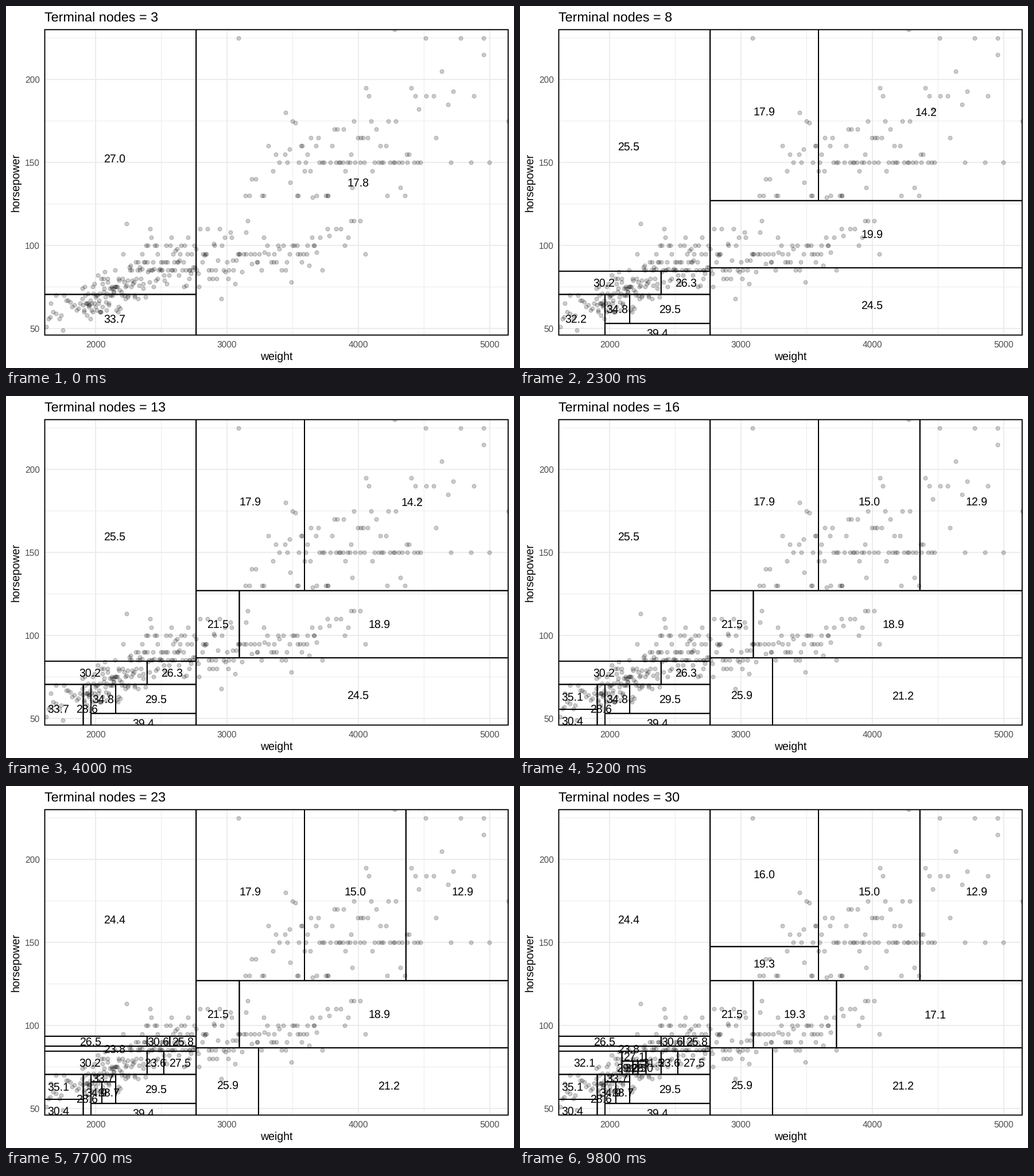
A matplotlib script that plays this animation: 885x632 px, repeating every 10 s.

```python
import matplotlib.pyplot as plt
import numpy as np
from matplotlib.animation import FuncAnimation
from matplotlib.collections import PolyCollection
from matplotlib.patches import Rectangle

W, H, DPI = 885, 632, 64
PT = 72 / DPI  # points per pixel
LEFT, TOP, RIGHT, BOTTOM = 67.5, 41.3, 874.8, 574.5
WEIGHTS, POWERS = (1613, 5140), (46, 230)
FRAMES, INTERVAL = 100, 100
FIRST, LAST = 3, 30
LINE = 1.9 * PT
INK = (0, 0, 0, 0.2)

plt.rcParams["font.family"] = "Liberation Sans"
plt.rcParams["text.hinting"] = "none"

# tree size: splits as (leaf, axis, cut, low side, high side)
SPLITS = {
    4: [("17.8", "y", 127, "20.7", "14.7")],
    5: [("27.0", "y", 84.5, "29.0", "25.5")],
    6: [("20.7", "y", 86.5, "24.5", "19.9")],
    7: [("29.0", "x", 2392, "30.2", "26.3")],
    8: [("14.7", "x", 3590, "17.9", "14.2")],
    9: [("33.7", "x", 1965, "32.2", "34.0"),
        ("34.0", "y", 53, "39.4", "33.9"),
        ("33.9", "x", 2153, "34.8", "29.5")],
    12: [("19.9", "x", 3094, "21.5", "18.9")],
    13: [("32.2", "x", 1906, "33.7", "28.6")],
    14: [("14.2", "x", 4362, "15.0", "12.9")],
    15: [("24.5", "x", 3240, "25.9", "21.2")],
    16: [("33.7", "y", 55.5, "30.4", "35.1")],
    17: [("25.5", "y", 93.5, "26.4", "24.4"),
         ("26.4", "y", 87.5, "23.8", "27.0")],
    19: [("34.8", "y", 66, "36.6", "33.7")],
    20: [("26.3", "x", 2519, "23.6", "27.5")],
    21: [("27.0", "x", 2392, "26.5", "28.0"),
         ("28.0", "x", 2565, "30.6", "25.8")],
    23: [("36.6", "x", 2048, "34.9", "38.7")],
    24: [("17.9", "y", 147.5, "19.3", "16.0")],
    25: [("30.2", "x", 2094, "32.1", "29.8"),
         ("29.8", "x", 2277, "28.9", "31.5"),
         ("28.9", "y", 78.5, "29.9", "27.1"),
         ("29.9", "x", 2177, "29.2", "30.1"),
         ("30.1", "x", 2216, "32.5", "28.0")],
    30: [("18.9", "x", 3727, "19.3", "17.1")],
}


def px(weight):
    lo, hi = WEIGHTS
    return LEFT + (weight - lo) * (RIGHT - LEFT) / (hi - lo)


def py(power):
    lo, hi = POWERS
    return BOTTOM - (power - lo) * (BOTTOM - TOP) / (hi - lo)


def cloud(rng, n, weights, shares, powers, noise, limits):
    """Cars spread along a trend, with power favouring multiples of five."""
    w = np.interp((np.arange(n) + rng.random(n)) / n, shares, weights)
    hp = np.interp(w, weights, powers) * (1 + noise * rng.normal(size=n))
    hp = np.clip(hp, *limits)
    fives = rng.random(n) < np.interp(hp, [60, 85, 105], [0.2, 0.45, 0.9])
    return w, np.where(fives, 5 * np.round(hp / 5), np.round(hp))


def make_points():
    rng = np.random.default_rng(7)
    w1, hp1 = cloud(rng, 285,
                    [1613, 1900, 2180, 2450, 2765, 3100, 3700, 4060],
                    [0, 0.07, 0.31, 0.5, 0.68, 0.81, 0.96, 1],
                    [57, 64, 74, 90, 94, 95, 101, 112], 0.1, (46, 125))
    w2, hp2 = cloud(rng, 101,
                    [3130, 3430, 3760, 4150, 4480, 4750, 5000],
                    [0, 0.1, 0.35, 0.65, 0.88, 0.96, 1],
                    [136, 143, 148, 160, 185, 195, 195], 0.12, (129, 225))
    common = (w2 > 3390) & (w2 < 4720) & (rng.random(w2.size) < 0.22)
    hp2[common] = 150
    lone = np.array([(3086, 225), (4278, 230), (5140, 175), (2234, 113),
                     (4951, 225), (4997, 150)])
    return (np.concatenate([w1, w2, lone[:, 0]]),
            np.concatenate([hp1, hp2, lone[:, 1]]))


def split(leaves, name, axis, cut, low, high):
    out = []
    for leaf in leaves:
        label, x0, x1, y0, y1 = leaf
        if label != name:
            out.append(leaf)
        elif axis == "x":
            out += [(low, x0, cut, y0, y1), (high, cut, x1, y0, y1)]
        else:
            out += [(low, x0, x1, y0, cut), (high, x0, x1, cut, y1)]
    return out


def padded(lo, hi):
    pad = 0.025 * (hi - lo)
    return lo - pad, hi + pad


def grow_trees():
    leaves = [("all", *padded(*WEIGHTS), *padded(*POWERS))]
    leaves = split(leaves, "all", "x", 2765, "light", "17.8")
    leaves = split(leaves, "light", "y", 70.5, "33.7", "27.0")
    trees = {}
    for n in range(FIRST, LAST + 1):
        for rule in SPLITS.get(n, []):
            leaves = split(leaves, *rule)
        trees[n] = leaves
    return trees


def start(n):
    """Frame at which the title reaches n."""
    return 4 * (n - FIRST) - max(0, n - 20)


def size_at(frame):
    return max(n for n in range(FIRST, LAST + 1) if start(n) <= frame)


TREES = grow_trees()

fig = plt.figure(figsize=(W / DPI, H / DPI), dpi=DPI, facecolor="white")
ax = fig.add_axes([0, 0, 1, 1])
ax.set_xlim(0, W)
ax.set_ylim(H, 0)
ax.axis("off")

panel = Rectangle((LEFT, TOP), RIGHT - LEFT, BOTTOM - TOP, fill=False,
                  ec="black", lw=LINE, zorder=6, snap=False)
ax.add_patch(panel)


def write(x, y, s, size, **kw):
    kw.setdefault("ha", "center")
    return ax.text(x, y, s, fontsize=size * PT, va="baseline", **kw)


def grid(weights, powers, width):
    style = dict(color="#EBEBEB", lw=width, zorder=1, snap=False,
                 solid_capstyle="butt")
    for w in weights:
        ax.plot([px(w)] * 2, [TOP, BOTTOM], **style)
    for hp in powers:
        ax.plot([LEFT, RIGHT], [py(hp)] * 2, **style)


grid(range(2500, 5000, 1000), range(75, 230, 50), LINE / 2)
grid(range(2000, 5001, 1000), range(50, 201, 50), LINE)

for w in range(2000, 5001, 1000):
    write(px(w), 595.5, str(w), 15.5, color="#4D4D4D")
for hp in range(50, 201, 50):
    write(58.7, py(hp) + 5.5, str(hp), 15.5, color="#4D4D4D", ha="right")
write((LEFT + RIGHT) / 2, 618, "weight", 19.5)
write(22.3, (TOP + BOTTOM) / 2, "horsepower", 19.5, rotation=90,
      rotation_mode="anchor")
title = write(LEFT - 0.5, 26.5, "", 23.4, ha="left")

weight, power = make_points()
dots = ax.scatter(px(weight), py(power), s=(6.9 * PT) ** 2, facecolors=[INK],
                  edgecolors=[INK], linewidths=1.2 * PT, zorder=2)
dots.set_clip_path(panel)

boxes = PolyCollection([], facecolors="none", edgecolors="black",
                       linewidths=LINE, zorder=4, snap=False)
ax.add_collection(boxes, autolim=False)
boxes.set_clip_path(panel)

labels = [write(0, 0, "", 19.5, zorder=5, clip_on=True) for _ in range(LAST)]
for label in labels:
    label.set_clip_path(panel)


def update(frame):
    # the tree is redrawn one frame ahead of its title
    leaves = TREES[size_at(frame + 1)]
    title.set_text(f"Terminal nodes = {size_at(frame)}")
    boxes.set_verts([[(px(x0), py(y0)), (px(x1), py(y0)),
                      (px(x1), py(y1)), (px(x0), py(y1))]
                     for _, x0, x1, y0, y1 in leaves])
    for label in labels:
        label.set_text("")
    for label, (name, x0, x1, y0, y1) in zip(labels, leaves):
        label.set_position((px((x0 + x1) / 2), py((y0 + y1) / 2) + 7.8))
        label.set_text(name)
    return [title, boxes, *labels]


anim = FuncAnimation(fig, update, frames=FRAMES, interval=INTERVAL,
                     repeat=True, repeat_delay=0, blit=False)
plt.show()
```
